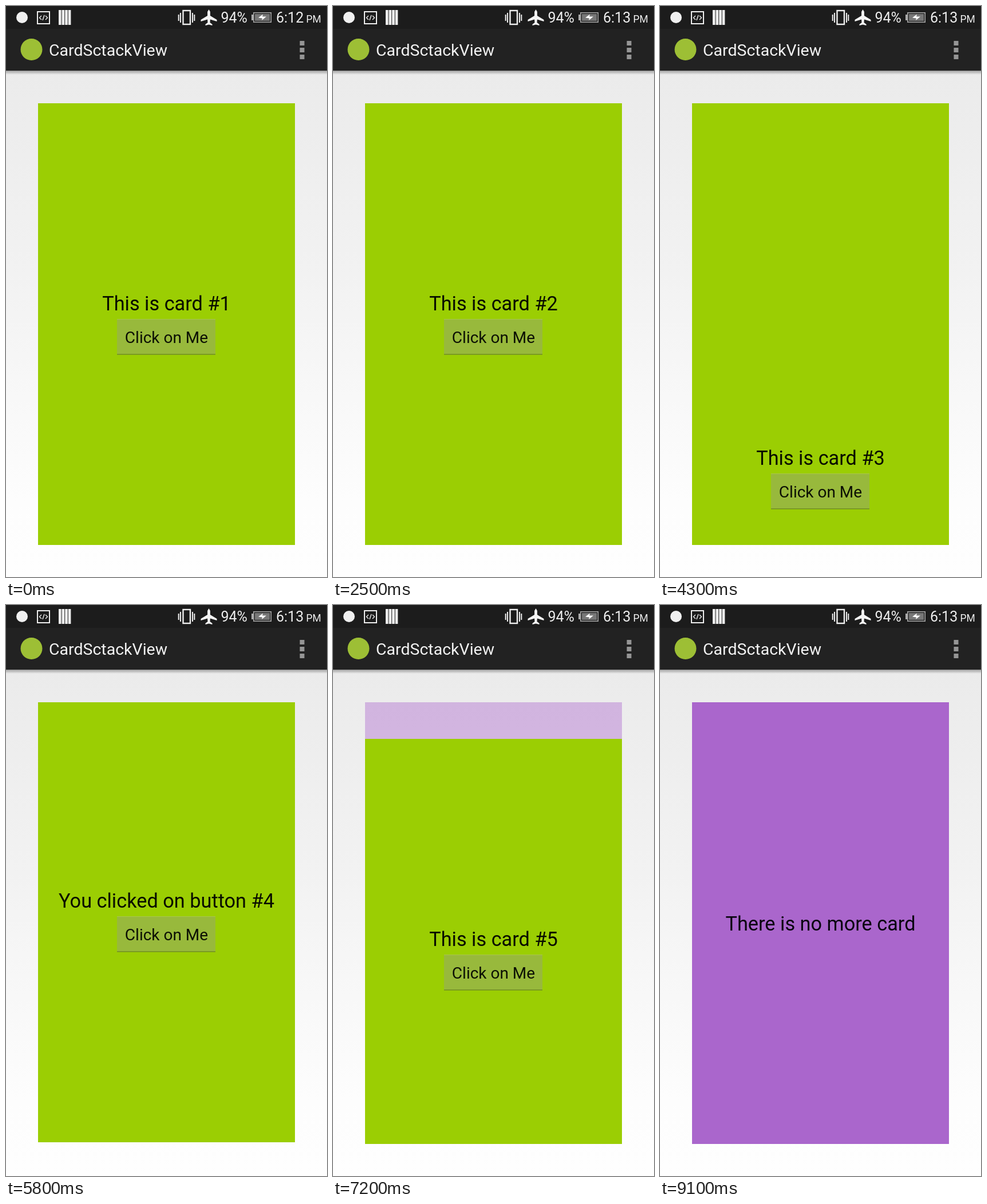
Recreate the animation shown at these times as an HTML page with a canvas. Size 561x998 px, loop 9.2 s.

```html
<!DOCTYPE html>
<html lang="en">
<head>
<meta charset="utf-8">
<title>Card stack</title>
<style>
  html, body { margin: 0; width: 561px; height: 998px; overflow: hidden; }
  canvas { display: block; }
</style>
</head>
<body>
<canvas id="stage" width="561" height="998"></canvas>
<script>
const ctx = document.getElementById('stage').getContext('2d');
const LOOP = 9200;
const STEP = 100;
const CARD = { x: 56, y: 170, w: 449, h: 772 };
const MID = CARD.x + CARD.w / 2;
const CLICK_AT = 5100;
const MINUTE_AT = 2000;

// When each card starts to leave, how long it takes, and which way (-1 is up).
const swipes = [
  { start: 1550, time: 870, dir: -1 },
  { start: 2650, time: 797, dir: 1 },
  { start: 3850, time: 761, dir: 1 },
  { start: 5745, time: 885, dir: -1 },
  { start: 6950, time: 865, dir: 1 }
];

function rect(x, y, w, h, color) {
  ctx.fillStyle = color;
  ctx.fillRect(x, y, w, h);
}

function disc(x, y, r, color) {
  ctx.fillStyle = color;
  ctx.beginPath();
  ctx.arc(x, y, r, 0, Math.PI * 2);
  ctx.fill();
}

function path(points, closed) {
  ctx.beginPath();
  points.forEach(([x, y]) => ctx.lineTo(x, y));
  if (closed) ctx.closePath();
}

function label(text, x, y, size, color, align = 'left') {
  ctx.font = `${size}px Roboto, sans-serif`;
  ctx.textAlign = align;
  ctx.fillStyle = color;
  ctx.fillText(text, x, y);
}

function drawBackground() {
  const shade = ctx.createLinearGradient(0, 114, 0, 998);
  shade.addColorStop(0, '#ebebeb');
  shade.addColorStop(0.4, '#f2f2f2');
  shade.addColorStop(0.85, '#fdfdfd');
  shade.addColorStop(1, '#fefefe');
  rect(0, 0, 561, 998, shade);
}

function drawCodeIcon() {
  ctx.lineWidth = 2;
  ctx.strokeRect(55, 10, 21, 21);
  ctx.lineWidth = 1.4;
  [[[62, 17], [58.5, 20.5], [62, 24]],
   [[67, 16], [64, 25]],
   [[69, 17], [72.5, 20.5], [69, 24]]].forEach(points => {
    path(points);
    ctx.stroke();
  });
}

function drawVibrateIcon() {
  ctx.lineWidth = 2.4;
  ctx.strokeRect(309.5, 8, 12.5, 24);
  for (const side of [-1, 1]) {
    rect(315.5 + side * 10.5 - 1, 12, 2, 17, '#eee');
    rect(315.5 + side * 13.8 - 1, 15, 2, 11, '#eee');
  }
}

function drawPlane() {
  const half = [[0, -14], [2.4, -10], [2.4, -3], [14, 4], [14, 7],
    [2.4, 3.5], [2, 9], [6, 12], [6, 14], [0, 12.5]];
  const mirror = half.map(([x, y]) => [-x, y]).reverse();
  path([...half, ...mirror].map(([x, y]) => [x + 354.5, y + 20]), true);
  ctx.fillStyle = '#f4f4f4';
  ctx.fill();
}

function drawBattery() {
  rect(429, 15, 4, 10, '#aaa');
  rect(432, 11, 32, 18, '#aaa');
  rect(433.5, 12.5, 29, 15, '#222');
  rect(435, 14, 26, 12, '#777');
  path([[441, 20.5], [449, 14.5], [448, 18.5], [455, 18.5],
    [447, 25], [448, 21.5]], true);
  ctx.fillStyle = '#fff';
  ctx.fill();
}

function drawBars(t) {
  const shadow = ctx.createLinearGradient(0, 113, 0, 120);
  shadow.addColorStop(0, 'rgba(0,0,0,.32)');
  shadow.addColorStop(1, 'rgba(0,0,0,0)');
  rect(0, 113, 561, 7, shadow);
  rect(0, 0, 561, 40, '#1c1c1c');
  rect(0, 40, 561, 73, '#222');

  ctx.strokeStyle = '#eee';
  disc(28, 20, 10, '#f0f0f0');
  drawCodeIcon();
  for (let i = 0; i < 4; i++) rect(92 + i * 5.6, 7, 4.6, 26, '#eee');
  drawVibrateIcon();
  drawPlane();
  drawBattery();
  label('94%', 375.5, 29, 25, '#eee');
  label(t < MINUTE_AT ? '6:12' : '6:13', 472, 29, 25, '#eee');
  label('PM', 524.5, 29, 17.5, '#eee');

  disc(44.5, 76, 19, '#9dbf35');
  label('CardSctackView', 75, 87, 28.5, '#f2f2f2');
  for (let i = 0; i < 3; i++) rect(513.5, 61 + i * 12, 8, 8, '#959595');
}

function drawButton() {
  rect(194, 547.5, 172, 61.5, '#98b93c');
  rect(194, 547, 172, 1, '#a8c64e');
  rect(194, 608, 172, 1.6, '#739027');
  label('Click on Me', MID, 589, 28, '#0c1004', 'center');
}

function drawCard(index, t, shift, alpha) {
  ctx.save();
  ctx.globalAlpha = alpha;
  ctx.translate(0, shift);
  const last = index === swipes.length;
  rect(CARD.x, CARD.y, CARD.w, CARD.h, last ? '#aa66cc' : '#9bce03');
  if (last) {
    label('There is no more card', MID, 569, 34.3, '#090510', 'center');
  } else {
    const clicked = index === 3 && t >= CLICK_AT;
    const words = clicked ? 'You clicked on button #' : 'This is card #';
    label(words + (index + 1), MID, 532, 34.3, '#080c00', 'center');
    drawButton();
  }
  ctx.restore();
}

function drawStack(t) {
  const top = swipes.filter(s => t >= s.start + s.time).length;
  const swipe = swipes[top];
  const progress = swipe ? Math.max(0, (t - swipe.start) / swipe.time) : 0;
  const shift = swipe ? Math.round(swipe.dir * CARD.h * progress ** 2) : 0;

  ctx.save();
  ctx.beginPath();
  ctx.rect(CARD.x, CARD.y, CARD.w, CARD.h);
  ctx.clip();
  // The next card fades in over the first fifth of the travel.
  if (shift) drawCard(top + 1, t, 0, Math.min(1, 5 * Math.abs(shift) / CARD.h));
  drawCard(top, t, shift, 1);
  ctx.restore();
}

function draw(now) {
  const t = Math.floor((now % LOOP) / STEP) * STEP;
  drawBackground();
  drawStack(t);
  drawBars(t);
}

const begin = performance.now();
function tick() {
  draw(performance.now() - begin);
  requestAnimationFrame(tick);
}
tick();
</script>
</body>
</html>
```
